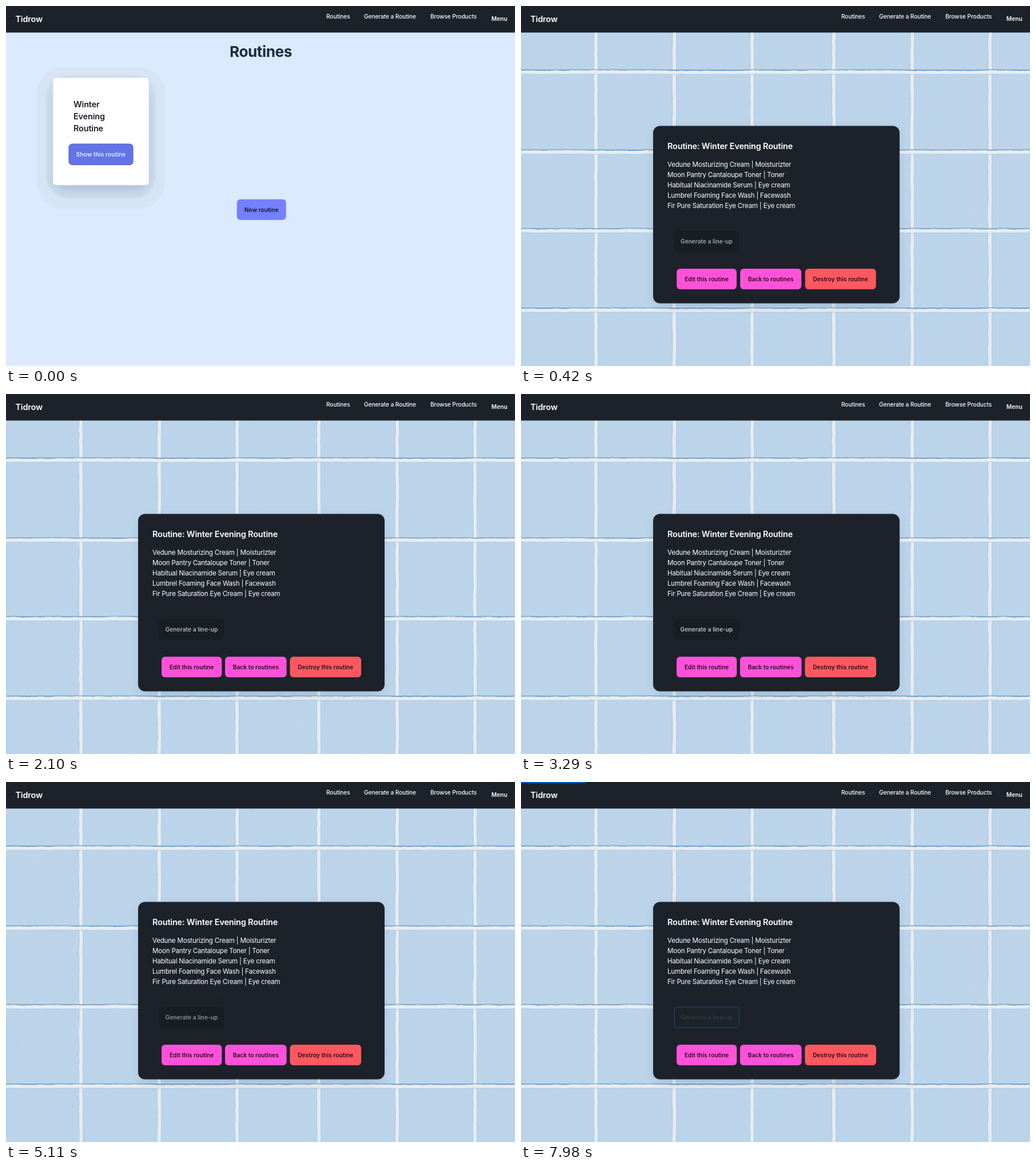
These frames come from a looping animation (890 px wide and 629 px high, 8000 ms). An HTML page with a canvas:

```html
<!DOCTYPE html>
<html lang="en">
<head>
<meta charset="utf-8">
<title>Routines</title>
<style>
  html, body { margin: 0; width: 100%; height: 100%; overflow: hidden; background: #dbeafe; }
  canvas, svg { position: absolute; left: 0; top: 0; display: block; }
  text { font: 500 10.16px Inter, "Open Sans", sans-serif; fill: #fff; white-space: pre; }
  .nav { letter-spacing: -.09px; }
  .bold { font-weight: 600; }
  .title { font-size: 14.5px; font-weight: 600; letter-spacing: -.2px; }
  .head { font-size: 26.1px; font-weight: 700; letter-spacing: -.4px; fill: #1c2a3c; }
  .row { font-size: 11.6px; font-weight: 400; letter-spacing: -.22px; }
  .dark { fill: #1d222a; }
  .faint { fill: #20262e; }
  .btn { transform-box: fill-box; transform-origin: center; }
  .btn text { font-weight: 600; text-anchor: middle; letter-spacing: .05px; }
</style>
</head>
<body>
<canvas id="wall" width="890" height="629"></canvas>
<svg width="890" height="629" viewBox="0 0 890 629">
  <defs>
    <filter id="soft" x="-30%" y="-30%" width="160%" height="160%"><feGaussianBlur stdDeviation="9"/></filter>
    <filter id="edge"><feGaussianBlur stdDeviation="1.2"/></filter>
  </defs>

  <g id="list">
    <rect width="890" height="629" fill="#dbeafe"/>
    <text class="head" x="391" y="89">Routines</text>
    <rect x="54" y="107" width="224" height="247" rx="46" fill="#d5e5f6" filter="url(#edge)"/>
    <rect x="70" y="121" width="192" height="215" rx="40" fill="#cadcec" filter="url(#edge)"/>
    <rect x="86" y="150" width="160" height="170" rx="14" fill="#a9bdd0" filter="url(#soft)"/>
    <rect x="81.8" y="124.8" width="168.4" height="188.4" rx="6" fill="#fff" stroke="#c3ced8" stroke-width=".7"/>
    <g id="name"></g>
    <g id="listButtons"></g>
    <g id="status">
      <path d="M0 620H109q3 0 3 3V629H0z" fill="#cbdaee"/>
      <text x="1" y="631.5" style="font-size:9px;font-weight:400;fill:#e6effc">0.0.0.0:3000/routines/31</text>
    </g>
  </g>

  <g id="detail">
    <rect x="235" y="216" width="423" height="307" rx="12" fill="#35506b" opacity=".22" filter="url(#soft)"/>
    <rect x="231" y="209.5" width="431" height="310" rx="12" class="dark"/>
    <text class="title" x="256" y="250">Routine: Winter Evening Routine</text>
    <g id="products"></g>
    <text class="row faint" x="256" y="377">Nothing generated for this routine yet</text>
    <g id="detailButtons"></g>
  </g>

  <rect width="890" height="46.4" class="dark"/>
  <text class="title" x="16.5" y="28">Tidrow</text>
  <text class="nav" x="560" y="21.7">Routines</text>
  <text class="nav" x="626" y="21.7">Generate a Routine</text>
  <text class="nav" x="742" y="21.7">Browse Products</text>
  <text class="bold" x="848.8" y="26">Menu</text>
  <rect id="bar" height="1.6" fill="#0065e8"/>
</svg>
<script>
const $ = id => document.getElementById(id);

// Wall of glazed tiles, repeating every 416 px
const SIZE = 416;
let seed = 7;
const rnd = () => (seed = seed * 16807 % 2147483647) / 2147483647;

function drawWall() {
  const cell = document.createElement('canvas');
  cell.width = cell.height = SIZE;
  const c = cell.getContext('2d');
  c.fillStyle = '#bcd4ea';
  c.fillRect(0, 0, SIZE, SIZE);

  for (let i = 0; i < 200; i++) {
    c.fillStyle = rnd() < .5 ? 'rgba(150,185,218,.2)' : 'rgba(206,225,243,.3)';
    c.fillRect(rnd() * SIZE, rnd() * SIZE, 1, 1 + rnd() * 4);
  }

  const joint = (pos, level) => {
    let drift = 0;
    for (let a = 0; a < SIZE; a++) {
      const box = (offset, size, color) => {
        c.fillStyle = color;
        level ? c.fillRect(a, pos + offset, 1, size) : c.fillRect(pos + offset, a, size, 1);
      };
      drift = drift * .93 + (rnd() - .5) * .4;
      box(-4.5, 9, 'rgba(168,199,228,.4)');
      if (level) box(-5 + drift, 2, `rgba(88,144,194,${.6 + drift / 3})`);
      box(-2.8 + drift, 5.6 - drift / 2, '#e8ecef');
    }
  };
  for (const x of [131, 268, 404]) joint(x, false);
  for (const y of [115.7, 255.5, 393]) joint(y, true);

  const g = $('wall').getContext('2d');
  g.fillStyle = g.createPattern(cell, 'repeat');
  g.filter = 'blur(.4px)';
  g.fillRect(-9, -9, 908, 647);
}

const lines = (id, cls, x, y, step, words) => $(id).innerHTML = words.map((s, i) =>
  `<text class="${cls}" x="${x}" y="${y + i * step}">${s}</text>`).join('');

function button(parent, x, y, w, color, ink, label) {
  const g = document.createElementNS('http://www.w3.org/2000/svg', 'g');
  g.setAttribute('class', 'btn');
  g.innerHTML = `<rect x="${x}" y="${y}" width="${w}" height="36" rx="6" fill="${color}"/>
    <text x="${x + w / 2}" y="${y + 21.8}" style="fill:${ink}">${label}</text>`;
  return $(parent).appendChild(g);
}

function paint(btn, fill, stroke, ink, scale) {
  const [rect, label] = btn.children;
  rect.style.fill = fill;
  rect.style.stroke = stroke;
  label.style.fill = ink;
  btn.style.transform = `scale(${scale})`;
}

drawWall();
lines('name', 'title dark', 118, 176.5, 21, ['Winter', 'Evening', 'Routine']);
lines('products', 'row', 256, 280.5, 18, [
  'Vedune Mosturizing Cream | Moisturizter',
  'Moon Pantry Cantaloupe Toner | Toner',
  'Habitual Niacinamide Serum | Eye cream',
  'Lumbrel Foaming Face Wash | Facewash',
  'Fir Pure Saturation Eye Cream | Eye cream'
]);

const PINK = '#ff52d9', RED = '#ff5861', PLUM = '#2a0a1c';
const show = button('listButtons', 110.5, 241.2, 111, '', '', 'Show this routine');
button('listButtons', 403.7, 337.8, 86, '#7480ff', '#0c1a30', 'New routine');
const generate = button('detailButtons', 268, 393.2, 113, '', '', 'Generate a line-up');
const actions = [
  button('detailButtons', 272, 459, 105.3, PINK, PLUM, 'Edit this routine'),
  button('detailButtons', 383, 459, 107.5, PINK, PLUM, 'Back to routines'),
  button('detailButtons', 496.5, 459, 124.5, RED, PLUM, 'Destroy this routine')
];

function render(t) {
  const ramp = (from, to) => Math.min(1, Math.max(0, (t - from) / (to - from)));
  const ease = (from, to) => 1 - (1 - ramp(from, to)) ** 2;
  const mix = (a, b, f) => `color-mix(in srgb, ${b} ${f * 100}%, ${a})`;

  const first = t < 420;
  $('list').style.display = first ? '' : 'none';
  $('detail').style.display = first ? 'none' : '';

  const release = ease(0, 280);
  paint(show, mix('#6374e8', '#4a67da', release), mix('#4862b8', '#4a67da', release),
    mix('#e6eafe', '#fff', release), 1.01 - .01 * release);
  $('status').style.opacity = ramp(210, 350);

  const load = ease(420, 560), wake = ease(2030, 2240), hover = ease(3570, 4060);
  const press = ease(4970, 5390), focus = ease(5950, 6300);
  const fill = mix(mix('#191d24', '#14171c', hover), '#1d232a', press);
  const ink = mix(mix(mix('#a3a6ab', '#bec1c6', wake), '#fff', hover), '#32373e', press);
  paint(generate, fill, mix(fill, '#125088', focus), ink, .99 + .01 * load);
  for (const b of actions) b.style.transform = `scale(${.995 + .005 * load})`;

  $('bar').setAttribute('width', t < 5740 ? 0 : 89 + 24.5 * ramp(6020, 7980));
}

function tick() {
  // the screen was refreshed every 70 ms
  render(Math.floor(performance.now() % 8000 / 70) * 70);
  requestAnimationFrame(tick);
}
tick();
</script>
</body>
</html>
```
